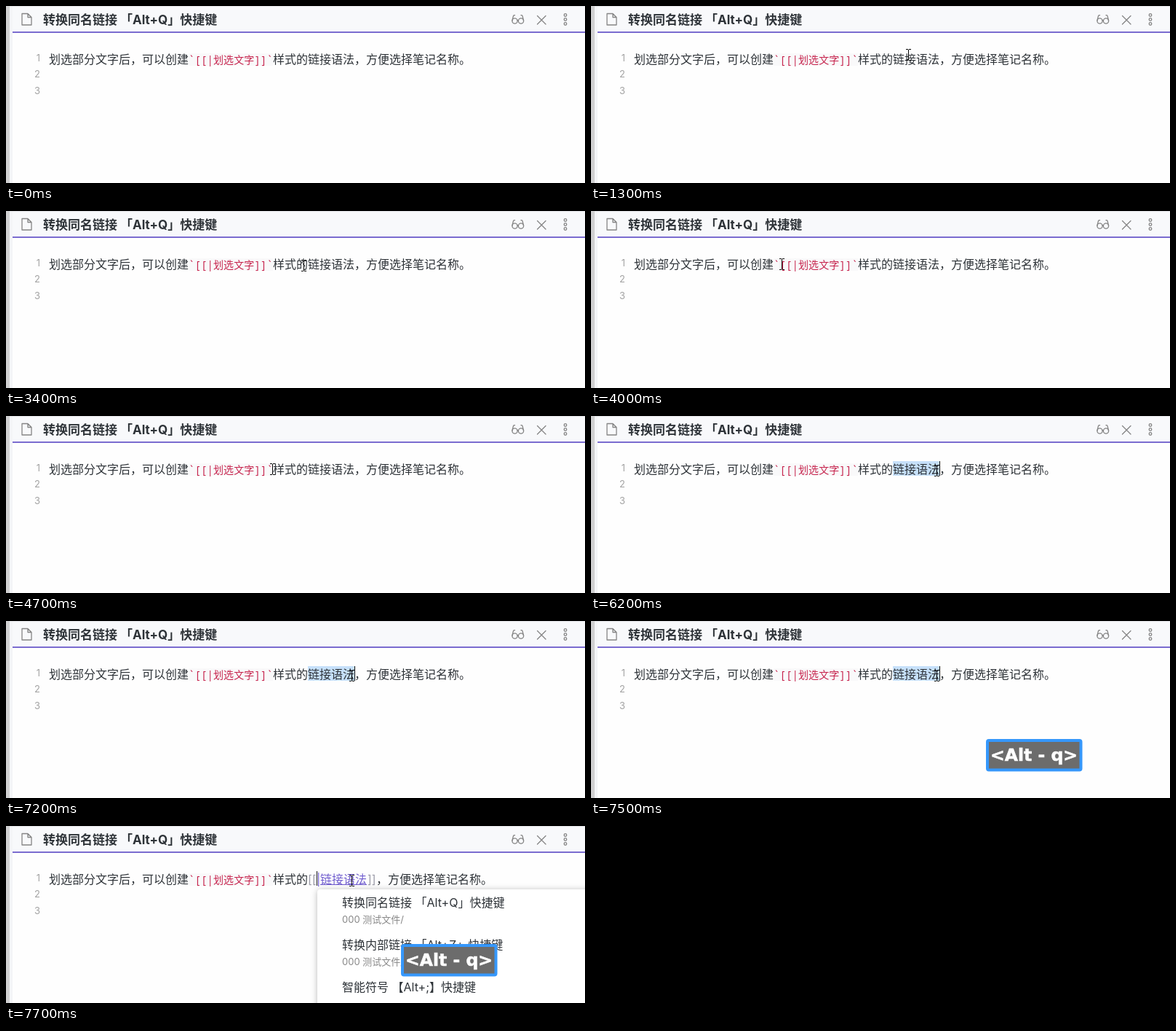
Animation of 796 by 243 pixels, one loop 8000 ms. Source, as an HTML page:

```html
<!DOCTYPE html>
<html lang="zh-CN">
<head>
<meta charset="utf-8">
<title>转换同名链接</title>
<style>
html, body { margin: 0; height: 100%; overflow: hidden; background: #fefefe; }
svg { display: block; width: 100vw; height: 100vh; }
text { font: 16px Inter, "Noto Sans CJK SC", sans-serif; fill: #2e3338; }
.title { font-size: 17px; font-weight: 700; }
.num { font-size: 13px; fill: #a3a3a3; text-anchor: end; }
.code { font: 14px "Noto Sans Mono", "Noto Sans CJK SC", monospace; letter-spacing: .1px; fill: #c7254e; }
.link { fill: #705dcf; }
.mark { fill: #9c9ca8; }
.path { font-size: 13px; fill: #888; }
.key { font: 700 23.5px "DejaVu Sans", sans-serif; fill: #fff; stroke: #fff; stroke-width: .6; text-anchor: middle; }
.icons { fill: none; stroke: #858585; stroke-width: 1.3; stroke-linecap: round; stroke-linejoin: round; }
.menu { filter: drop-shadow(0 1px 4px rgba(0, 0, 0, .28)); }

/* 100 ms = 1.25% */
.anim { animation: 8s step-end infinite; }
.mouse { animation-name: mouse; opacity: 0; }
.sel { animation-name: select; transform: scaleX(0); }
.caret { animation-name: caret; opacity: 0; }
.before { animation-name: before; }
.after { animation-name: after; opacity: 0; }
.menu { animation-name: menu; opacity: 0; }
.keys { animation-name: keys; opacity: 0; }

@keyframes mouse {
  0% { opacity: 0; transform: translate(733px, 47px); }
  7.5% { opacity: 1; transform: translate(733px, 47px); }
  8.75% { transform: translate(664px, 50px); }
  10% { transform: translate(592px, 54px); }
  11.25% { transform: translate(530px, 58px); }
  12.5% { transform: translate(484px, 62px); }
  13.75% { transform: translate(454px, 65px); }
  15% { transform: translate(440px, 66px); }
  16.25% { transform: translate(436px, 67px); }
  42.5% { transform: translate(409px, 75px); }
  43.75% { transform: translate(373px, 78px); }
  45% { transform: translate(338px, 78px); }
  46.25% { transform: translate(308px, 77px); }
  47.5% { transform: translate(286px, 75px); }
  48.75% { transform: translate(271px, 74px); }
  50% { transform: translate(262px, 73px); }
  51.25% { transform: translate(259px, 73px); }
  55% { transform: translate(286px, 73px); }
  56.25% { transform: translate(327px, 73px); }
  57.5% { transform: translate(356px, 73px); }
  58.75% { transform: translate(366px, 73px); }
  65% { transform: translate(371px, 73px); }
  66.25% { transform: translate(384px, 74px); }
  67.5% { transform: translate(400px, 74px); }
  68.75% { transform: translate(412px, 75px); }
  70% { transform: translate(416px, 75px); }
  72.5% { transform: translate(419px, 75px); }
  73.75% { transform: translate(432px, 75px); }
  75% { transform: translate(449px, 75px); }
  76.25% { transform: translate(465px, 75px); }
  77.5%, 100% { opacity: 1; transform: translate(475px, 75px); }
}
@keyframes select {
  0% { transform: scaleX(0); }
  73.75% { transform: scaleX(1); }
  75% { transform: scaleX(2); }
  76.25% { transform: scaleX(3); }
  77.5% { transform: scaleX(4); }
  95%, 100% { transform: scaleX(0); }
}
@keyframes caret {
  0% { opacity: 0; transform: translateX(415px); }
  72.5% { opacity: 1; transform: translateX(415px); }
  73.75% { transform: translateX(431px); }
  75% { transform: translateX(447px); }
  76.25% { transform: translateX(463px); }
  77.5% { transform: translateX(479px); }
  83.75% { opacity: 0; }
  90% { opacity: 1; }
  95%, 100% { opacity: 1; transform: translateX(427px); }
}
@keyframes before { 0% { opacity: 1; } 95%, 100% { opacity: 0; } }
@keyframes after { 0% { opacity: 0; } 95%, 100% { opacity: 1; } }
@keyframes menu { 0% { opacity: 0; } 96.25%, 100% { opacity: 1; } }
@keyframes keys { 0% { opacity: 0; } 93.75%, 100% { opacity: 1; } }
</style>
</head>
<body>
<svg viewBox="0 0 796 243">
  <rect width="796" height="243" fill="#fefefe"/>
  <rect x="5" width="4" height="243" fill="#f4f5f7"/>
  <rect width="5" height="243" fill="#d0d0d1"/>

  <rect x="9" width="787" height="35" fill="#f8f9fb"/>
  <rect x="5" width="791" height="1" fill="#e2e3e6"/>
  <rect x="9" y="35" width="787" height="2" fill="#7b6cd0"/>
  <g class="icons">
    <path d="M22 10.5h8l5 5v10.5h-13zM30 10.5v5h5"/>
    <circle cx="699.5" cy="20.5" r="3.6"/>
    <circle cx="708" cy="20.5" r="3.6"/>
    <path d="M703 19.8q.8-.8 1.5 0M695.9 20l1.6-6.4q.4-1.2 2-1M711.6 20l-1.6-6.4q-.4-1.2-2-1"/>
    <path d="M730.5 13.5l11.5 11.5M742 13.5l-11.5 11.5"/>
    <circle cx="769" cy="12.5" r="1.8"/>
    <circle cx="769" cy="18.5" r="1.8"/>
    <circle cx="769" cy="24.5" r="1.8"/>
  </g>
  <text class="title" x="51" y="24.5">转换同名链接 「Alt+Q」快捷键</text>

  <text class="num" x="47" y="76">1</text>
  <text class="num" x="47" y="98">2</text>
  <text class="num" x="47" y="121">3</text>

  <g transform="translate(415 62)"><rect class="anim sel" width="16" height="20" fill="#c6e0fa"/></g>
  <rect x="251" y="65" width="116" height="17" fill="#f9f9fa"/>
  <text x="59" y="78.5">划选部分文字后，可以创建</text>
  <text class="code" x="251" y="78.5">`[[|划选文字]]`</text>
  <text x="367" y="78.5">样式的</text>
  <text class="anim before" x="415" y="78.5">链接语法，方便选择笔记名称。</text>
  <g class="anim after">
    <text class="mark" x="415" y="78.5">[[</text>
    <text class="link" x="427" y="78.5">|</text>
    <text class="link" x="432" y="78.5">链接语法</text>
    <rect x="432" y="80" width="64" height="1" fill="#705dcf"/>
    <text class="mark" x="497" y="78.5">]]</text>
    <text x="509" y="78.5">，方便选择笔记名称。</text>
  </g>
  <rect class="anim caret" y="62" width="1" height="20" fill="#111"/>

  <g class="anim menu">
    <rect x="428" y="87" width="400" height="200" rx="4" fill="#fff"/>
    <text x="462" y="111">转换同名链接 「Alt+Q」快捷键</text>
    <text class="path" x="462" y="133">000 测试文件/</text>
    <text x="462" y="169">转换内部链接 「Alt+Z」快捷键</text>
    <text class="path" x="462" y="191">000 测试文件/</text>
    <text x="462" y="227">智能符号 【Alt+;】快捷键</text>
  </g>

  <g class="anim keys">
    <rect x="545" y="164" width="128.5" height="40.5" rx="2" fill="#6c6c6c" stroke="#3597fb" stroke-width="4"/>
    <text class="key" x="609" y="191.5">&lt;Alt - q&gt;</text>
  </g>

  <path class="anim mouse" d="M-3-7.5H0M1-7.5H4M.5-7V7M-3 7.5H0M1 7.5H4" fill="none" stroke="#000"/>
</svg>
</body>
</html>
```
